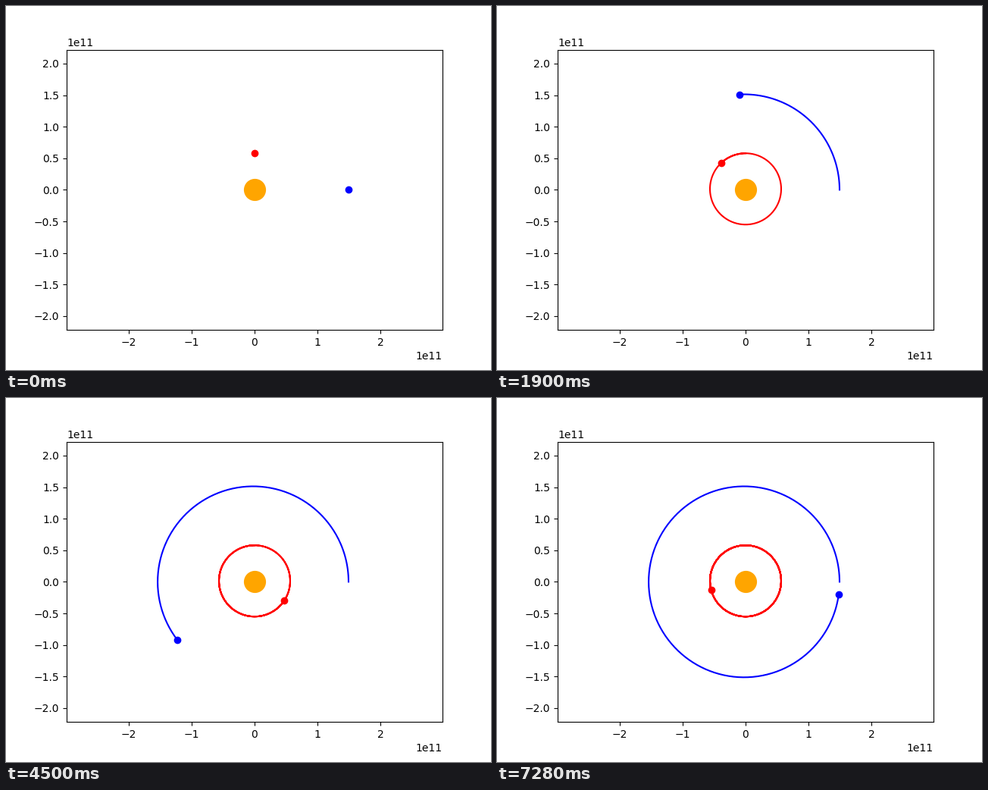
Recreate the animation shown at these times as a matplotlib script. Size 640 px wide and 480 px high, loop 7.3 s.

```python
import numpy as np
import matplotlib.pyplot as plt
from matplotlib.animation import FuncAnimation

DAYS = 365
HALF = 2.98e11  # half width of the view in metres


def orbit(a, e, period, periapsis, start):
    """Daily positions on a Kepler ellipse with the star at the origin.

    start is the mean anomaly on day 0, periapsis the direction of closest approach.
    """
    mean = start + 2 * np.pi * np.arange(DAYS) / period
    ecc = mean.copy()
    for _ in range(12):
        ecc = mean + e * np.sin(ecc)
    z = a * (np.cos(ecc) - e + 1j * np.sqrt(1 - e * e) * np.sin(ecc))
    z *= np.exp(1j * periapsis)
    return z.real, z.imag


fig, ax = plt.subplots(figsize=(6.4, 4.8), dpi=100)
ax.set_xlim(-HALF, HALF)
ax.set_ylim(-HALF * 369.6 / 496, HALF * 369.6 / 496)
ax.plot(0, 0, "o", color="orange", markersize=20)

planets = []
for color, path in [
    ("blue", orbit(1.5133e11, 0.0154, 371.6, 0, 0)),
    ("red", orbit(5.648e10, 0.0251, 84.75, -np.pi / 2, np.pi)),
]:
    trail, = ax.plot([], [], "-", color=color)
    dot, = ax.plot([], [], "o", color=color)
    planets.append((path, trail, dot))


def update(day):
    for (x, y), trail, dot in planets:
        trail.set_data(x[:day + 1], y[:day + 1])
        dot.set_data([x[day]], [y[day]])
    return [artist for _, *pair in planets for artist in pair]


anim = FuncAnimation(fig, update, frames=DAYS, interval=20, repeat=True,
                     repeat_delay=0, blit=False)
plt.show()
```
